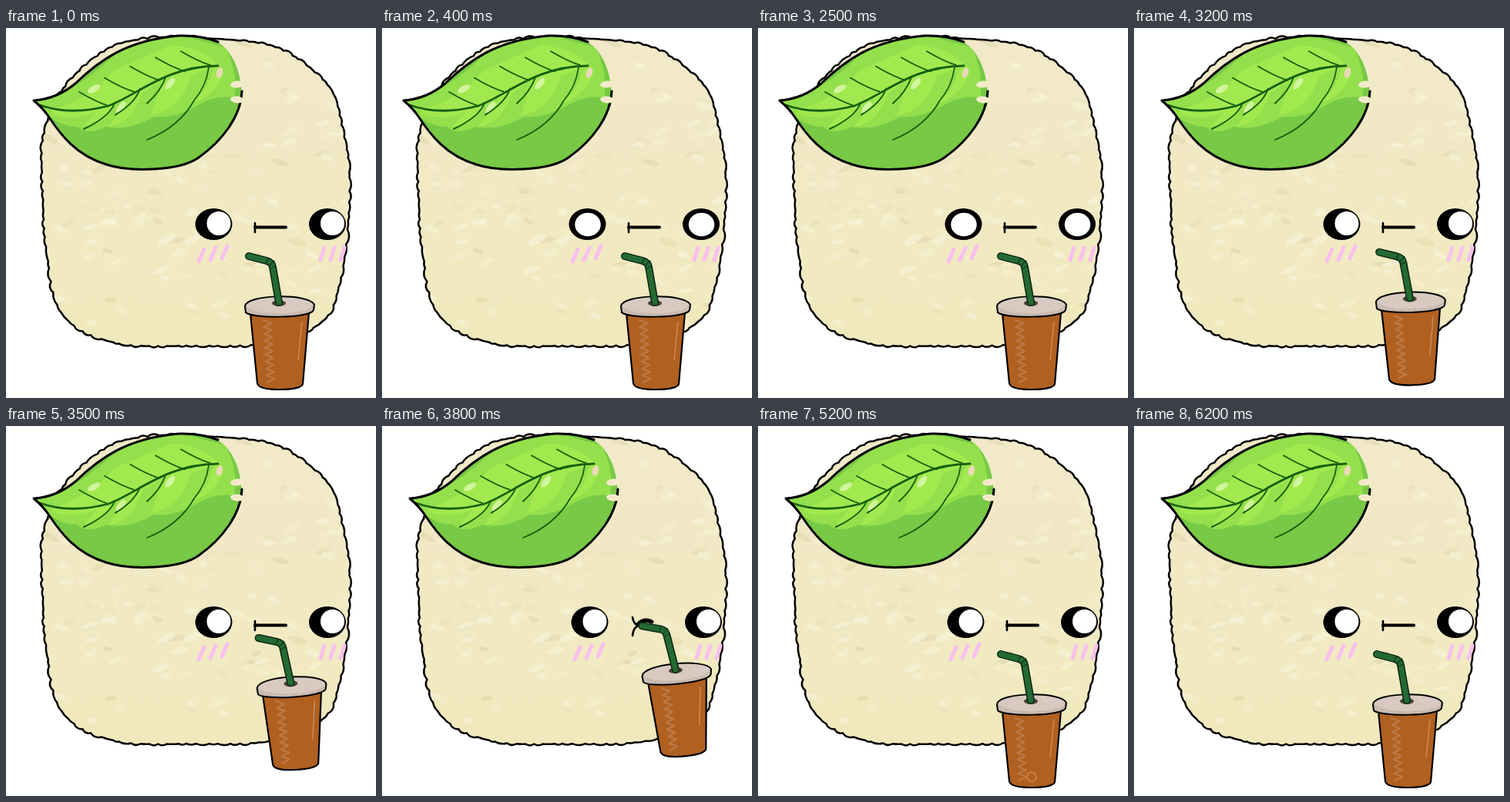
Recreate the animation shown at these times as an HTML page with a canvas. Size 480x480 px, loop 6.4 s.

```html
<!DOCTYPE html>
<html lang="en">
<head>
<meta charset="utf-8">
<title>Rice ball and iced tea</title>
<style>
  html, body { margin: 0; width: 100%; height: 100%; overflow: hidden; background: #fff; }
  canvas { display: block; }
</style>
</head>
<body>
<canvas id="stage" width="480" height="480"></canvas>
<script>
const ctx = document.getElementById('stage').getContext('2d');
const LOOP = 6400, INK = '#000';

let seed = 11;
const rand = (lo, hi) => {
  seed = (seed * 16807) % 2147483647;
  return lo + (hi - lo) * seed / 2147483647;
};

function fill(path, color) {
  ctx.fillStyle = color;
  ctx.fill(new Path2D(path));
}
function line(path, color, width) {
  ctx.strokeStyle = color;
  ctx.lineWidth = width;
  ctx.stroke(new Path2D(path));
}
function oval(x, y, rx, ry, color, turn = 0) {
  ctx.fillStyle = color;
  ctx.beginPath();
  ctx.ellipse(x, y, rx, ry, turn, 0, Math.PI * 2);
  ctx.fill();
}
function shifted(x, y, draw) {
  ctx.save();
  ctx.translate(x, y);
  draw();
  ctx.restore();
}

// Smooth closed curve through a few key points, clockwise, with an uneven rice edge
const keys = [
  [77, 76], [135, 26], [195, 13], [270, 14], [335, 21], [368, 34], [398, 55], [424, 84], [435, 125],
  [445, 182], [443, 260], [433, 330], [411, 380], [345, 408], [240, 412], [140, 408], [73, 371],
  [53, 290], [48, 215], [49, 140]
];
const spline = (a, b, c, d, u) =>
  b + u / 2 * (c - a + u * (2 * a - 5 * b + 4 * c - d + u * (3 * (b - c) + d - a)));

function ricePath() {
  const edge = [];
  keys.forEach((key, i) => {
    const [a, b, c, d] = [-1, 0, 1, 2].map(k => keys[(i + k + keys.length) % keys.length]);
    const steps = Math.round(Math.hypot(c[0] - b[0], c[1] - b[1]) / 13);
    for (let k = 0; k < steps; k++) {
      const u = (k + rand(0, 0.5)) / steps;
      edge.push([0, 1].map(axis => spline(a[axis], b[axis], c[axis], d[axis], u)));
    }
  });
  const path = new Path2D();
  path.moveTo(...edge[0]);
  edge.forEach(([x, y], i) => {
    const [nx, ny] = edge[(i + 1) % edge.length];
    const bulge = rand(0.05, 0.4);
    path.quadraticCurveTo((x + nx) / 2 + (ny - y) * bulge, (y + ny) / 2 - (nx - x) * bulge, nx, ny);
  });
  path.closePath();
  return path;
}
const body = ricePath();

const grains = Array.from({ length: 150 }, (_, i) => ({
  x: rand(50, 455), y: rand(15, 408), length: rand(5, 13), width: rand(2, 5), turn: rand(-0.6, 0.6),
  color: i % 3 ? `rgba(249,245,220,${rand(0.25, 0.7)})` : `rgba(222,213,170,${rand(0.2, 0.6)})`
}));

const rice = ctx.createLinearGradient(0, 0, 0, 415);
rice.addColorStop(0, '#f1e9c9');
rice.addColorStop(1, '#f1e9bd');

function drawBody(shift) {
  ctx.save();
  ctx.fillStyle = rice;
  ctx.fill(body);
  ctx.clip(body);
  ctx.translate(shift, 0);
  for (const g of grains) oval(g.x, g.y, g.length, g.width, g.color, g.turn);
  ctx.restore();
  ctx.strokeStyle = INK;
  ctx.lineWidth = 2.5;
  ctx.stroke(body);
}

// The outline fades out on the right, so the inked edge is open
const LEAF_EDGE = 'M306 82 C305 114 281 146 250 168 C225 186 160 187 130 177 C90 165 70 137 56 116 ' +
  'Q49 105 36 94 Q66 92 90 72 C120 43 155 16 224 10 Q252 9 275 18';
const LEAF = LEAF_EDGE + 'Q302 36 306 82Z';
const MIDRIB = 'M44 100 Q83 114 133 101 C174 85 207 50 275 49';

function drawLeaf() {
  const VEIN = '#17600f';
  ctx.save();
  ctx.clip(new Path2D(LEAF));
  fill(LEAF, '#78c946');
  fill('M36 94 Q90 88 150 25 L224 9 L285 25 Q302 60 296 90 Q270 86 244 103 Q215 118 192 115 ' +
    'Q160 134 130 128 Q106 140 92 128 Q70 128 50 110Z', '#93e04c');
  fill('M60 111 Q88 122 118 108 L100 128 Q128 126 141 100 L160 92 L132 129 Q164 124 177 84 ' +
    'L203 67 L188 114 Q228 105 240 62 L270 50 Q262 84 238 98 Q268 92 282 60 ' +
    'Q270 28 215 22 L140 55 Q110 92 60 106Z', '#a2e94f');
  oval(149, 103, 9, 4, '#d0f59d', -0.9);
  oval(213, 72, 9, 4, '#d0f59d', -0.9);
  oval(114, 79, 9, 4, '#d0f59d', -0.5);
  oval(277, 58, 4, 7, '#ead9b8', 0.3);
  ctx.restore();

  line(MIDRIB, VEIN, 2.8);
  for (let i = 0; i < 5; i++) {
    const x = 133 + 33 * i, y = 101 - 20 * i + 1.7 * i * i;
    line(`M${x} ${y} q-16 -5 -38 -18`, VEIN, 1.8);
    if (i < 3) line(`M${x + 8} ${y - 4} q-6 18 ${8 * i - 40} 34`, VEIN, 2);
  }
  line('M183 145 Q225 128 244 94 Q260 75 263 51', VEIN, 1.8);
  line(LEAF_EDGE, INK, 3);
  for (const side of [-1, 1]) oval(300, 83 + 10 * side, 9, 4.5, '#f4ebca', 0.1 * side);
}

function drawEyes(lookAside, t) {
  for (const x of [269.5, 417]) {
    oval(x, 254.5, 24, 20.5, INK);
    if (lookAside) {
      oval(x + 6.5, 253.5, 15.5, 15.5, '#fff');
    } else {
      const blink = t === 1100 || t === 2400;
      const size = t >= 1500 && t < 2200 ? 1 : 0.93;
      oval(x + 0.5, 255, 18 * size, blink ? 3 : 16.5 * size, '#fff');
    }
  }
}

function drawMouth(mood) {
  if (mood === 'sip') {
    line('M325 248 Q326 256 332 259 Q326 262 325 272', INK, 2.6);
    line('M332 257 Q340 249 350 254', INK, 5);
    return;
  }
  line('M323 253 V265', INK, 2.6);
  line('M323 258.5 H363', INK, 4);
  if (mood === 'open') fill('M326 257 H364 L361 265 H329Z', INK);
}

function drawCheeks() {
  for (let i = 0; i < 3; i++) {
    line(`M${250 + 15 * i} ${303 - 2 * i} l7 -16`, '#f8c0ee', 5);
    line(`M${408 + 13 * i} 301 l5 -16`, '#f8c0ee', 5);
  }
}

function drawCup(bubble) {
  const CUP = 'M317 370 L326 461 Q328 469 354 469 Q382 469 385 462 L393 369Z';
  fill(CUP, '#b06020');
  let scribble = 'M334 379';
  for (let i = 0; i < 9; i++) scribble += 'l10 4 l-9.5 5';
  line(scribble, '#bd7944', 2.4);
  line('M384 381 L379 430', '#c88a58', 1.6);
  if (bubble) {
    ctx.strokeStyle = '#cd8c4d';
    ctx.lineWidth = 1.5;
    ctx.beginPath();
    ctx.arc(bubble.x, bubble.y, 6, 0, Math.PI * 2);
    ctx.stroke();
  }
  line(CUP, INK, 2.2);

  const LID = 'M310 361 C312 345 394 344 400 359 L399 366 C394 377 318 377 311 369Z';
  fill(LID, '#c9bbb0');
  oval(355, 359.5, 43, 10.5, '#d8cac0');
  line(LID, INK, 2);
  oval(354, 357, 9, 4, '#4d4238');

  const STRAW = 'M354 356 L346 310 Q345 304 338 302 L315 296';
  line(STRAW, '#0b2614', 10);
  line(STRAW, '#246a33', 7);
  line('M337 306 L340 299 M341 309 L348 302 M343 312 L350 309', '#0d3a1c', 1.3);
}

// The cup tips as it rises, turning about the foot of the straw
function drawLiftedCup(lift, bubble) {
  shifted(354 + 27 * lift, 357 - 40 * lift, () => {
    ctx.rotate(-0.08 * lift);
    ctx.translate(-354, -357);
    drawCup(bubble);
  });
}

function liftAt(t) {
  if (t < 3200 || t >= 5200) return 0;
  return Math.min(1, (t - 3100) / 700, (5200 - t) / 700);
}

function moodAt(t) {
  if (t >= 3800 && t < 4600) return 'sip';
  const chewing = [4600, 5600, 6000].some(start => t >= start && t < start + 200);
  return chewing ? 'open' : 'flat';
}

function bubbleAt(t) {
  if (t < 5200 || t >= 5800) return null;
  const p = (t - 5200) / 500;
  return { x: 355 + 18 * Math.sin(p * Math.PI), y: 455 - 68 * p };
}

function frame() {
  const t = Math.floor(performance.now() % LOOP / 100) * 100;
  const lookAside = t < 400 || t >= 2800;

  ctx.fillStyle = '#fff';
  ctx.fillRect(0, 0, 480, 480);
  ctx.lineCap = ctx.lineJoin = 'round';

  drawBody(lookAside ? 0 : -7);
  shifted(lookAside ? 0 : -8, 0, drawLeaf);
  shifted(lookAside ? 0 : -3, 0, () => {
    drawCheeks();
    drawEyes(lookAside, t);
    drawMouth(moodAt(t));
  });
  drawLiftedCup(liftAt(t), bubbleAt(t));
  requestAnimationFrame(frame);
}
frame();
</script>
</body>
</html>
```
